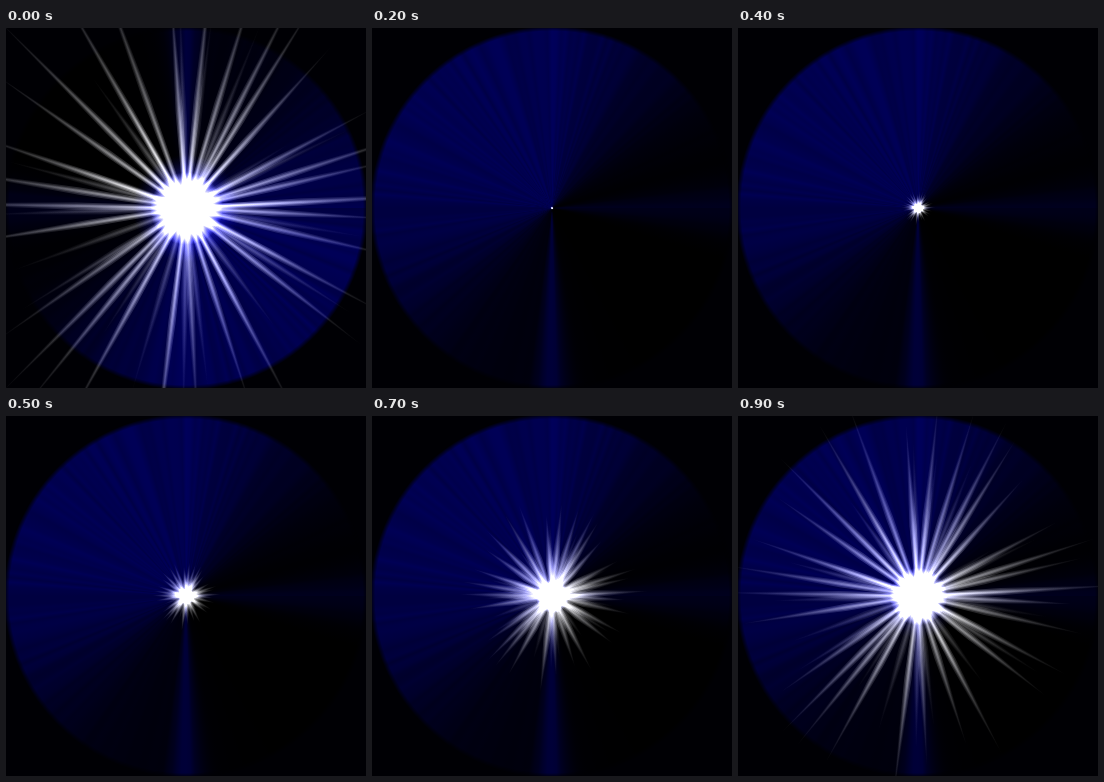
Recreate the animation shown at these times as an HTML page with a canvas. Size 360 px wide and 360 px high, loop 1 s.

```html
<!DOCTYPE html>
<html lang="en">
<head>
<meta charset="utf-8">
<title>Starburst</title>
<style>
html, body { margin: 0; width: 100%; height: 100%; overflow: hidden; background: #000; }
canvas { display: block; width: 360px; height: 360px; }
</style>
</head>
<body>
<canvas id="stage" width="360" height="360"></canvas>
<script>
const SIZE = 360, MID = 180, STEP = 100, COUNT = 10, TAU = Math.PI * 2;
const ctx = document.getElementById('stage').getContext('2d');

function seeded(seed) {
  return () => (seed = (seed * 16807) % 2147483647) / 2147483647;
}

// Flat-topped bump around an angle in degrees, clockwise from the right.
function bump(angle, center, half, power) {
  const d = Math.abs((angle - center + 540) % 360 - 180);
  return Math.exp(-Math.pow(d / half, power));
}

function skyLevel(angle) {
  return 80 * bump(angle, 225, 88, 4)
    + 48 * bump(angle, 90, 5, 2)
    + 28 * bump(angle, 0, 8, 2)
    + 10 * bump(angle, 105, 25, 2)
    + 10 * bump(angle, 270, 7, 2);
}

function makeSky(turn) {
  const layer = document.createElement('canvas');
  layer.width = layer.height = SIZE;
  const g = layer.getContext('2d'), rnd = seeded(77);
  const cone = g.createConicGradient(0, MID, MID);
  for (let a = 0; a <= 360; a += 1.5) {
    const level = skyLevel((a + turn) % 360) * (0.86 + 0.24 * rnd());
    cone.addColorStop(a / 360, `rgb(0,0,${Math.round(level)})`);
  }
  g.fillStyle = cone;
  g.fillRect(0, 0, SIZE, SIZE);
  const edge = g.createRadialGradient(MID, MID, 177, MID, MID, 182);
  edge.addColorStop(0, '#000');
  edge.addColorStop(1, 'transparent');
  g.globalCompositeOperation = 'destination-in';
  g.fillStyle = edge;
  g.fillRect(0, 0, SIZE, SIZE);
  return layer;
}

// Bright rays come in pairs around these directions, faint ones fill the gaps.
function makeRays() {
  const rnd = seeded(4021), rays = [];
  for (const a of [8, 33, 67, 92, 124, 140, 176, 194, 220, 245, 271, 292, 307, 337, 352]) {
    for (const side of [-5, 5]) {
      rays.push({ angle: a + side, len: 0.74 + 0.26 * rnd(), power: 0.75 + 0.25 * rnd() });
    }
  }
  for (let i = 0; i < 24; i++) {
    rays.push({ angle: (i + rnd()) * 15, len: 0.4 + 0.35 * rnd(), power: 0.35 + 0.2 * rnd() });
  }
  return rays;
}

function drawRay(angle, len, width, power) {
  ctx.save();
  ctx.translate(MID, MID);
  ctx.rotate(angle * TAU / 360);
  const fade = ctx.createLinearGradient(0, 0, len, 0);
  for (let at = 0; at <= 1; at += 0.25) {
    fade.addColorStop(at, `rgba(245,245,250,${0.34 * power * Math.pow(1 - at, 1.3)})`);
  }
  ctx.fillStyle = fade;
  for (const k of [1, 0.6, 0.28]) {
    const w = width * k;
    ctx.beginPath();
    ctx.moveTo(0, -w * 0.6);
    ctx.lineTo(len * 0.4, -w);
    ctx.lineTo(len, 0);
    ctx.lineTo(len * 0.4, w);
    ctx.lineTo(0, w * 0.6);
    ctx.fill();
  }
  ctx.restore();
}

function drawGlow(radius, stops) {
  const c = MID + 0.5;
  const glow = ctx.createRadialGradient(c, c, 0, c, c, radius);
  stops.forEach(([at, color]) => glow.addColorStop(at, color));
  ctx.fillStyle = glow;
  ctx.beginPath();
  ctx.arc(c, c, radius, 0, TAU);
  ctx.fill();
}

const calm = makeSky(0), flare = makeSky(180), rays = makeRays();

function draw(index) {
  // The burst peaks on the first step, then grows again from a point.
  const grow = (index || COUNT) / COUNT;
  const reach = 290 * Math.pow(grow, 3);
  const core = Math.max(0.6, 27 * Math.pow(grow, 2.2));
  const width = Math.min(3.6, reach * 0.06);
  const halo = 0.8 * Math.pow(grow, 8);

  ctx.globalCompositeOperation = 'source-over';
  ctx.fillStyle = '#000004';
  ctx.fillRect(0, 0, SIZE, SIZE);
  ctx.drawImage(index ? calm : flare, 0, 0);
  ctx.globalCompositeOperation = 'lighter';
  drawGlow(core * 2, [[0, `rgba(70,70,255,${halo})`], [0.6, `rgba(50,50,230,${halo * 0.5})`],
    [1, 'rgba(0,0,120,0)']]);
  rays.forEach(r => drawRay(r.angle, r.len * reach, width, r.power));
  drawGlow(core * 1.35, [[0, '#fff'], [0.62, '#fff'], [0.8, 'rgba(220,220,255,.5)'],
    [1, 'rgba(150,150,255,0)']]);
}

let shown = -1;
function tick() {
  const index = Math.floor(performance.now() / STEP) % COUNT;
  if (index !== shown) draw(shown = index);
  requestAnimationFrame(tick);
}
tick();
</script>
</body>
</html>
```
